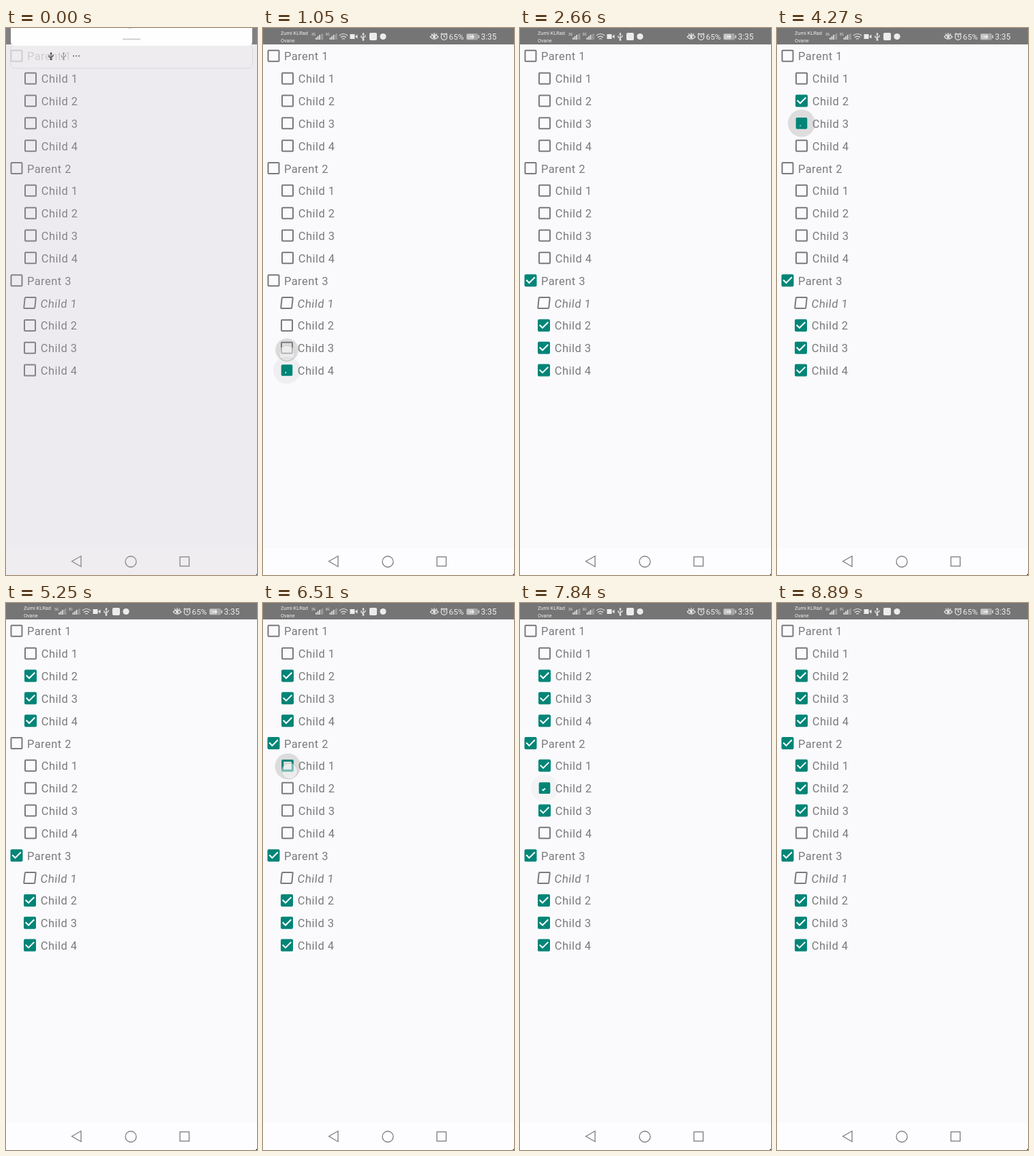
An HTML page that plays this animation: 368x800 px, repeating every 8.96 s.

```html
<!DOCTYPE html>
<html lang="en">
<head>
<meta charset="utf-8">
<title>Checkbox tree</title>
<style>
  html, body { margin: 0; width: 100%; height: 100%; overflow: hidden; background: #fafafc; }
  svg { display: block; font-family: Roboto, sans-serif; }
  .label { font-size: 16.4px; letter-spacing: .5px; fill: #7a7a7c; }
  .line { fill: none; stroke: #7c7c7e; stroke-width: 1.3; }
  .thin { fill: none; stroke: #e6e6e6; stroke-width: 1.2; }
</style>
</head>
<body>
<svg id="stage" width="368" height="800" viewBox="0 0 368 800">
  <defs>
    <g id="usb">
      <path d="M0 5V-4M0 3L-3 1V-1.5M0 2L3 0V-2" fill="none" stroke="currentColor" stroke-width="1.2"/>
      <path d="M-1.8-3L0-6L1.8-3Z" fill="currentColor"/>
      <circle cy="4.8" r="1.4" fill="currentColor"/>
    </g>
    <g id="signal">
      <text x="-6" y="11" font-size="5" fill="#eee">3G</text>
      <path d="M1 17v-3M3.5 17v-5M6 17v-7" stroke="#eee" stroke-width="1.5"/>
      <path d="M8.5 17v-8M10.5 17v-9" stroke="#aaa" stroke-width="1.2"/>
    </g>
  </defs>

  <rect width="368" height="800" fill="#fafafc"/>
  <rect y="760" width="368" height="40" fill="#fdfcfe"/>
  <g class="line">
    <path d="M96.5 780L110 772.3V787.7Z"/>
    <circle cx="183" cy="780.5" r="8"/>
    <rect x="255" y="773.5" width="13.5" height="13.5"/>
  </g>
  <path d="M368 798v2h-2z" fill="#222"/>

  <rect width="368" height="24" fill="#757575"/>
  <g fill="#ececec">
    <text x="26" y="9.5" font-size="7.4">Zumi KLRad</text>
    <text x="26" y="20.5" font-size="7.4">Ovane</text>
    <use href="#signal" x="77"/>
    <use href="#signal" x="97.5"/>
    <path class="thin" d="M112 11q6-5 12 0M114 13.8q4-3.4 8 0M116 16.3q2-1.6 4 0"/>
    <path d="M127.5 9h7v7h-7zM135 12.5l3.5-3v6z"/>
    <use href="#usb" x="147" y="12.5" color="#ececec"/>
    <rect x="156" y="7" width="11" height="11" rx="2"/>
    <circle cx="176" cy="12.5" r="4.6"/>
    <path class="thin" d="M245 13q6-6 12 0q-6 6-12 0M247 8l1.5 2M251 7v2M255 8l-1.5 2"/>
    <circle cx="251" cy="13" r="2"/>
    <circle class="thin" cx="265.5" cy="13" r="4.3"/>
    <path class="thin" d="M265.5 10v3h2M260.500 9.500l2.500-2M270.500 9.500l-2.500-2"/>
    <text x="272.5" y="17" font-size="11.8">65%</text>
    <rect x="298" y="8" width="17" height="9.5" rx="2" fill="#a6a6a6"/>
    <rect x="299" y="9" width="10" height="7.5" rx="1" fill="#c9c9c9"/>
    <path d="M303 12h4v-2l3 2.8l-3 2.8v-2h-4zM315.7 10.5h1.3v4.5h-1.3z"/>
    <text x="319.5" y="17" font-size="11.9">3:35</text>
  </g>

  <g id="rows"></g>

  <g id="shade">
    <rect width="368" height="800" fill="#bbb0b8" opacity=".19"/>
    <g id="panel">
      <rect x="6.5" y="25" width="355" height="34" rx="7" fill="#efedf0" fill-opacity=".7" stroke="#dad9dc"/>
      <use href="#usb" x="66" y="41" color="#444"/>
      <use href="#usb" x="84.5" y="41" color="#999"/>
      <path d="M98 41h2M102 41h2M106 41h2" stroke="#777" stroke-width="1.8"/>
      <path d="M7 0H361V20q0 6-6 6H13q-6 0-6-6z" fill="#fff"/>
      <path d="M171 16.500h26" stroke="#ccc" stroke-width="1.8"/>
      <path d="M179 0h5" stroke="#999"/>
    </g>
  </g>
</svg>
<script>
const LOOP = 8960, ENTER = 225, FADE = 200, TEAL = '#008577', GREY = '#7a7a7c';
const FRAME = 'M-7-9H7q2 0 2 2V7q0 2-2 2H-7q-2 0-2-2V-7q0-2 2-2z';
// row: [press time, check time, finger dx, finger dy]
const taps = {
  14: [700, 900, 0, 6],
  13: [990, 1190, 0, 8],
  12: [1600, 1690, 1, 6],
  10: [2150, 2240, 2, 5],
  2: [3350, 3480, 2, 5],
  3: [4040, 4130, 2, 6],
  4: [4660, 4770, 2, 6],
  5: [5860, 5980, 3, 5],
  6: [6400, 6490, 3, 8],
  8: [7030, 7140, 2, 6],
  7: [7460, 7620, 2, 6]
};
const $ = id => document.getElementById(id);
const clamp = v => Math.min(1, Math.max(0, v));

function add(parent, tag, attrs) {
  const el = document.createElementNS('http://www.w3.org/2000/svg', tag);
  set(el, attrs);
  return parent.appendChild(el);
}
function set(el, attrs) {
  for (const k in attrs) el.setAttribute(k, attrs[k]);
}

function makeRow(i) {
  const child = i % 5, last = i > 10;
  const x = child ? (last ? 35 : 36) : 15.5;
  const g = add($('rows'), 'g', { transform: `translate(${x} ${40.8 + 32.84 * i})` });
  const ripple = add(g, 'circle', { fill: '#000' });
  // one row of the list is sheared
  const body = add(g, 'g', i === 11 ? { transform: 'skewX(-6)' } : {});
  const mark = add(body, 'g', {});
  const box = add(mark, 'path', { 'fill-rule': 'evenodd' });
  const tick = add(mark, 'path', { fill: 'none', stroke: '#fff', 'stroke-width': 2 });
  const label = add(body, 'text', { class: 'label', x: child ? 15.8 : 15.4, y: 6.5 });
  label.textContent = child ? 'Child ' + child : 'Parent ' + (i / 5 + 1);
  const finger = add(g, 'circle', { r: 11.5, fill: '#fff', 'fill-opacity': .45, stroke: '#bbb', 'stroke-opacity': .6 });
  return { ripple, mark, box, tick, finger, tap: taps[i] || [Infinity, Infinity, 0, 0] };
}

function drawRow({ ripple, mark, box, tick, finger, tap }, t) {
  const [press, check, dx, dy] = tap;
  const grow = 1 - (1 - clamp((t - press) / ENTER)) ** 3;
  const release = Math.max(check, press + ENTER);
  set(ripple, {
    cx: dx * (1 - grow), cy: dy * (1 - grow), r: 12 + 8 * grow,
    opacity: t < press ? 0 : .12 * (1 - clamp((t - release) / FADE))
  });
  set(finger, { cx: dx, cy: dy, opacity: t >= press && t < check + 40 ? 1 : 0 });

  // the hole closes first, then the tick grows from its corner
  const age = t - check;
  const hole = 7 * (1 - clamp(age / 130));
  const k = clamp((age - 130) / 250);
  set(mark, { transform: `scale(${1 - .08 * Math.sin(Math.PI * clamp(age / 350))})` });
  set(box, {
    d: `${FRAME}M${-hole} ${-hole}V${hole}H${hole}V${-hole}z`,
    fill: age > 0 ? TEAL : GREY
  });
  set(tick, {
    d: `M${-2 - 4.3 * k} ${3.6 - 4.3 * k}L-2 3.6L${-2 + 8.3 * k} ${3.6 - 8.3 * k}`,
    opacity: k > 0 ? 1 : 0
  });
}

const rows = Array.from({ length: 15 }, (_, i) => makeRow(i));
const start = performance.now();

function frame() {
  const t = (performance.now() - start) % LOOP;
  const closing = clamp(t / 210);
  set($('shade'), { opacity: 1 - closing });
  set($('panel'), { transform: `translate(0 ${-26 * closing})` });
  rows.forEach(row => drawRow(row, t));
  requestAnimationFrame(frame);
}
frame();
</script>
</body>
</html>
```
